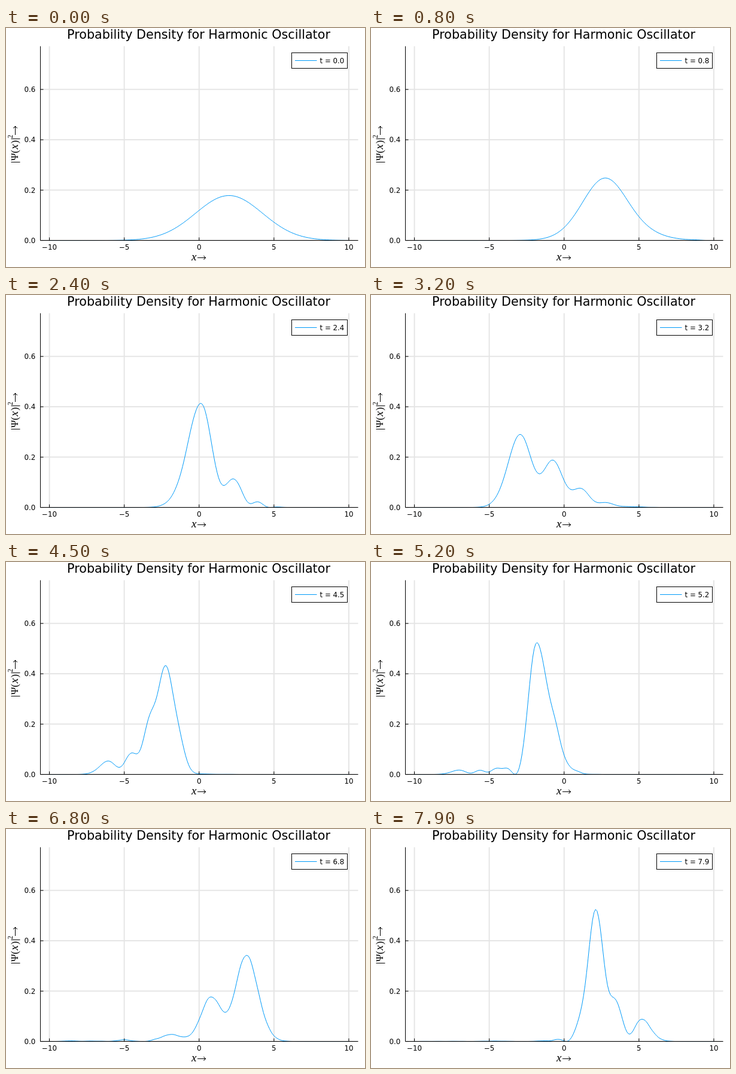
Recreate the animation shown at these times as an HTML page. Size 600 by 400 pixels, loop 8000 ms.

```html
<!DOCTYPE html>
<html lang="en">
<head>
<meta charset="utf-8">
<title>Probability density</title>
<style>
  html, body { margin: 0; width: 100%; height: 100%; overflow: hidden; background: #fff; }
  svg { display: block; }
  text { font-family: "DejaVu Sans", sans-serif; font-size: 11.8px; }
  .title { font-size: 20.7px; }
  .math text { font-family: "Liberation Serif", serif; font-size: 17px; }
  .math .var { font-style: italic; font-size: 19px; }
  .math .power { font-size: 11.5px; }
  .grid { stroke: #000; stroke-opacity: .1; stroke-width: 2; }
  .line { fill: none; stroke: #000; stroke-width: 1; }
  .wave { fill: none; stroke: #009af9; stroke-width: 1; stroke-linejoin: round; }
</style>
</head>
<body>
<svg width="600" height="400" viewBox="0 0 600 400">
  <text class="title" x="322" y="18.3" text-anchor="middle">Probability Density for Harmonic Oscillator</text>
  <path id="grid" class="grid"/>
  <path id="curve" class="wave"/>
  <path id="axes" class="line"/>
  <g id="labels"></g>
  <g class="math">
    <text class="var" x="310" y="389">x</text>
    <path class="line" d="M320 384.5H334M330.5 381Q331.5 384 334 384.5Q331.5 385 330.5 388"/>
  </g>
  <g class="math" transform="translate(20 227) rotate(-90)">
    <path class="line" d="M2.5 -11.5V3.5M41.5 -11.5V3.5M48 -4.5H63M59.5 -8Q60.5 -5 63 -4.5Q60.5 -4 59.5 -1"/>
    <text x="5" y="0">Ψ</text>
    <text x="17.5" y="0">(</text>
    <text class="var" x="24" y="0">x</text>
    <text x="33.5" y="0">)</text>
    <text class="power" x="42.5" y="-9">2</text>
  </g>
  <rect x="477.5" y="41.5" width="93" height="26" fill="#fff" stroke="#000"/>
  <path class="wave" d="M483 54.5H519.5"/>
  <text id="clock" x="524.5" y="59.2"></text>
</svg>
<script>
const byId = id => document.getElementById(id);
const toX = x => 322.75 + 25.02 * x;
const toY = p => 355.6 - 421.3 * p;

function drawAxes() {
  let grid = "", axes = "M57.5 30.5V355.5H588.5", labels = "";
  const label = (x, y, anchor, text) =>
    labels += `<text x="${x}" y="${y}" text-anchor="${anchor}">${text}</text>`;
  for (let v = -10; v <= 10; v += 5) {
    const x = toX(v);
    grid += `M${x} 30.5V355.5`;
    axes += `M${x} 355.5v-5`;
    label(x, 371.3, "middle", String(v).replace("-", "−"));
  }
  for (let i = 0; i < 4; i++) {
    const y = toY(i / 5);
    grid += `M57.5 ${y}H588.5`;
    axes += `M57.5 ${y}h5`;
    label(49.3, y + 4.3, "end", (i / 5).toFixed(1));
  }
  byId("grid").setAttribute("d", grid);
  byId("axes").setAttribute("d", axes);
  byId("labels").innerHTML = labels;
}

// Crank–Nicolson evolution of i ψ' = -ψ'' + x²/4 ψ; complex numbers are [re, im].
const COUNT = 201, DX = 0.1, DT = 0.1, STEPS = 80;
const position = j => -10 + j * DX;
const coupling = DT / 2 / DX ** 2;
const divide = ([a, b], [c, d]) => {
  const n = c * c + d * d;
  return [(a * c + b * d) / n, (b * c - a * d) / n];
};
const timesI = ([a, b], k) => [-b * k, a * k];
const add = (u, v) => [u[0] + v[0], u[1] + v[1]];

function startWave() {
  return Array.from({ length: COUNT }, (_, j) => {
    const x = position(j);
    const size = Math.exp(-((x - 2) ** 2) / 20) / (10 * Math.PI) ** 0.25;
    return [size * Math.cos(x), size * Math.sin(x)];
  });
}

function advance(psi) {
  const ratio = [], value = [];
  psi.forEach((p, j) => {
    let pivot = [1, DT / 2 * (2 / DX ** 2 + position(j) ** 2 / 4)];
    let right = p;
    if (j) {
      pivot = add(pivot, timesI(ratio[j - 1], coupling));
      right = add(right, timesI(value[j - 1], coupling));
    }
    ratio[j] = divide([0, -coupling], pivot);
    value[j] = divide(right, pivot);
  });
  for (let j = COUNT - 2; j >= 0; j--) {
    const [a, b] = ratio[j], [c, d] = value[j + 1];
    value[j] = [value[j][0] - a * c + b * d, value[j][1] - a * d - b * c];
  }
  return psi.map((p, j) => [2 * value[j][0] - p[0], 2 * value[j][1] - p[1]]);
}

function outline(psi) {
  return "M" + psi.map(([a, b], j) =>
    toX(position(j)).toFixed(2) + " " + toY(a * a + b * b).toFixed(2)).join("L");
}

const outlines = [];
for (let s = 0, psi = startWave(); s < STEPS; s++, psi = advance(psi)) outlines.push(outline(psi));

function render(ms) {
  const step = Math.floor(ms / 100) % STEPS;
  byId("curve").setAttribute("d", outlines[step]);
  byId("clock").textContent = "t = " + (step * DT).toFixed(1);
}

drawAxes();
render(0);
const begin = performance.now();
(function tick() {
  render(performance.now() - begin);
  requestAnimationFrame(tick);
})();
</script>
</body>
</html>
```
